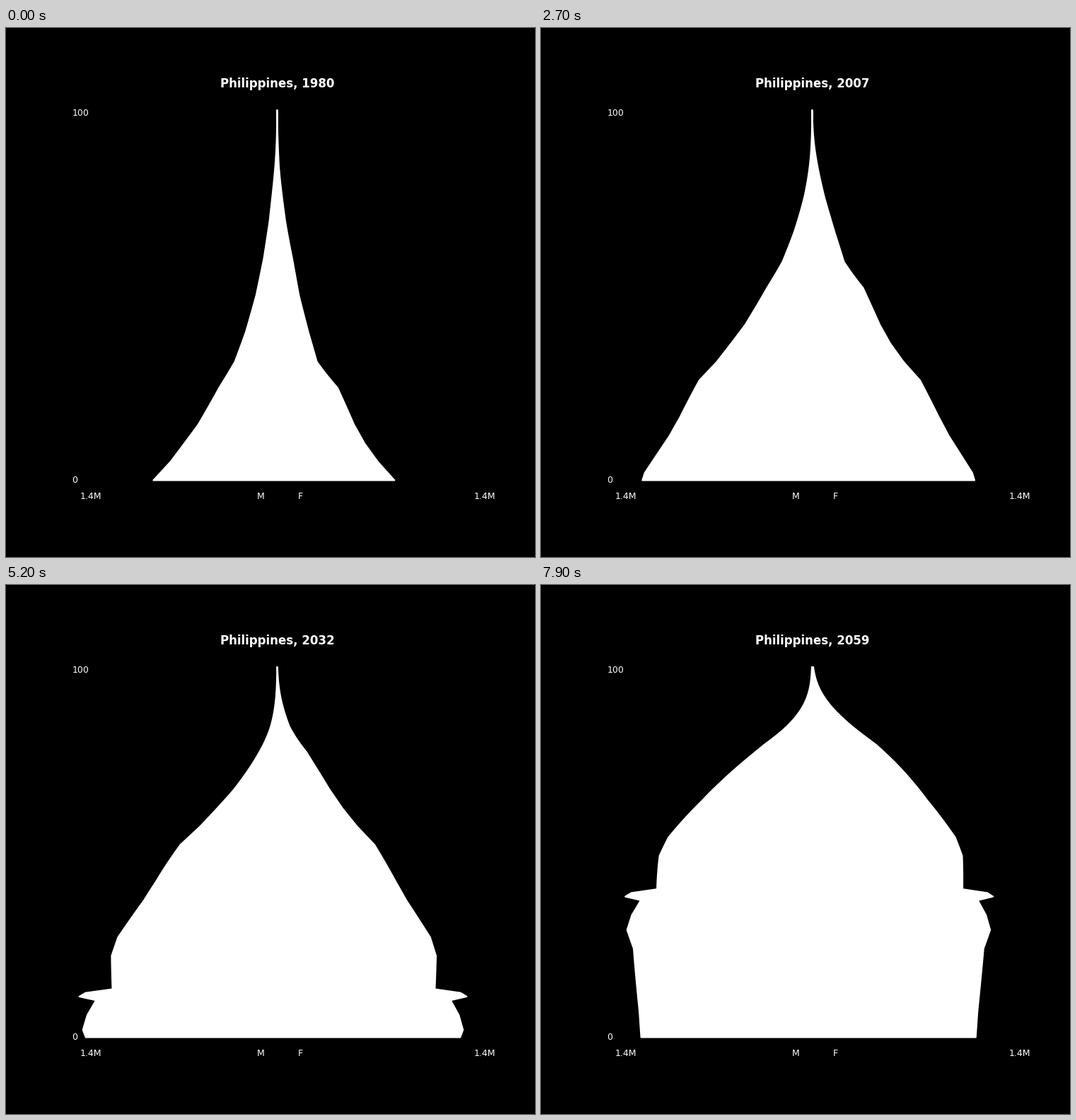
Write a matplotlib script that moves like this. It is 748 px wide and 748 px high and loops after 8 s.

```python
import numpy as np
import matplotlib.pyplot as plt
from matplotlib.animation import FuncAnimation

SIZE, DPI = 748, 100
START, YEARS = 1980, 80
AGES = np.arange(101)

# Boys born per year, as half width in pixels; the sharp jump is at 2020
BOYS = [(1910, 28.5), (1920, 34), (1930, 43.5), (1940, 57.5), (1948, 72),
        (1955, 93.5), (1965, 119.5), (1975, 153.5), (1980, 175), (1990, 195),
        (1995, 207), (2005, 237.5), (2010, 243.7), (2019, 238), (2020, 276.5),
        (2021, 285), (2022, 260.5), (2026, 271), (2030, 275.5), (2035, 263),
        (2052, 247), (2060, 241)]
# Girls per boy
RATIO = [(1895, 0.4), (1910, 0.77), (1920, 0.955), (1940, 0.955), (1948, 0.92),
         (1955, 1.03), (1970, 0.94), (1990, 0.957)]


def curve(points, x):
    return np.interp(x, *zip(*points))


def survival(born, rate, growth):
    """Share alive at each age: constant plus exponential mortality."""
    frailty = 0.5 + 1.2 / (1 + np.exp((born - 1976) / 11))
    aging = np.exp(growth * (AGES - 75)) - np.exp(-75 * growth)
    return np.exp(-frailty * (0.003 * AGES + rate / growth * aging))


def outline(year):
    born = year - AGES
    boys = curve(BOYS, born)
    men = boys * survival(born, 0.04, 0.075)
    women = boys * curve(RATIO, born) * survival(born, 0.0235, 0.09)
    return np.column_stack([np.r_[-men, women[::-1]], np.r_[AGES, AGES[::-1]]])


plt.rcParams["font.family"] = "DejaVu Sans"
fig, ax = plt.subplots(figsize=(SIZE / DPI, SIZE / DPI), dpi=DPI, facecolor="black")
fig.subplots_adjust(left=0.125, right=0.9, bottom=0.11, top=0.88)
half = SIZE * (0.9 - 0.125) / 2
ax.set_xlim(-half, half)
ax.set_ylim(-5, 105)
ax.axis("off")

body = plt.Polygon(outline(START), fc="white", ec="white", lw=1.5, joinstyle="round")
ax.add_patch(body)


def label(x, y, text, size=9, **style):
    return ax.text(x, y, text, size=size, color="white",
                   transform=ax.transAxes, **style)


title = label(0.5, 1.01, "", size=12, weight="bold", ha="center")
for x, y, text in [(0, 0.94, "100"), (0, 0.04, "0"), (0.02, 0, "1.4M"),
                   (0.45, 0, "M"), (0.55, 0, "F"), (0.98, 0, "1.4M")]:
    label(x, y, text)


def update(k):
    year = START + k
    body.set_xy(outline(year))
    title.set_text(f"Philippines, {year}")
    return body, title


anim = FuncAnimation(fig, update, frames=YEARS, interval=100, repeat=True,
                     repeat_delay=0)
plt.show()
```
